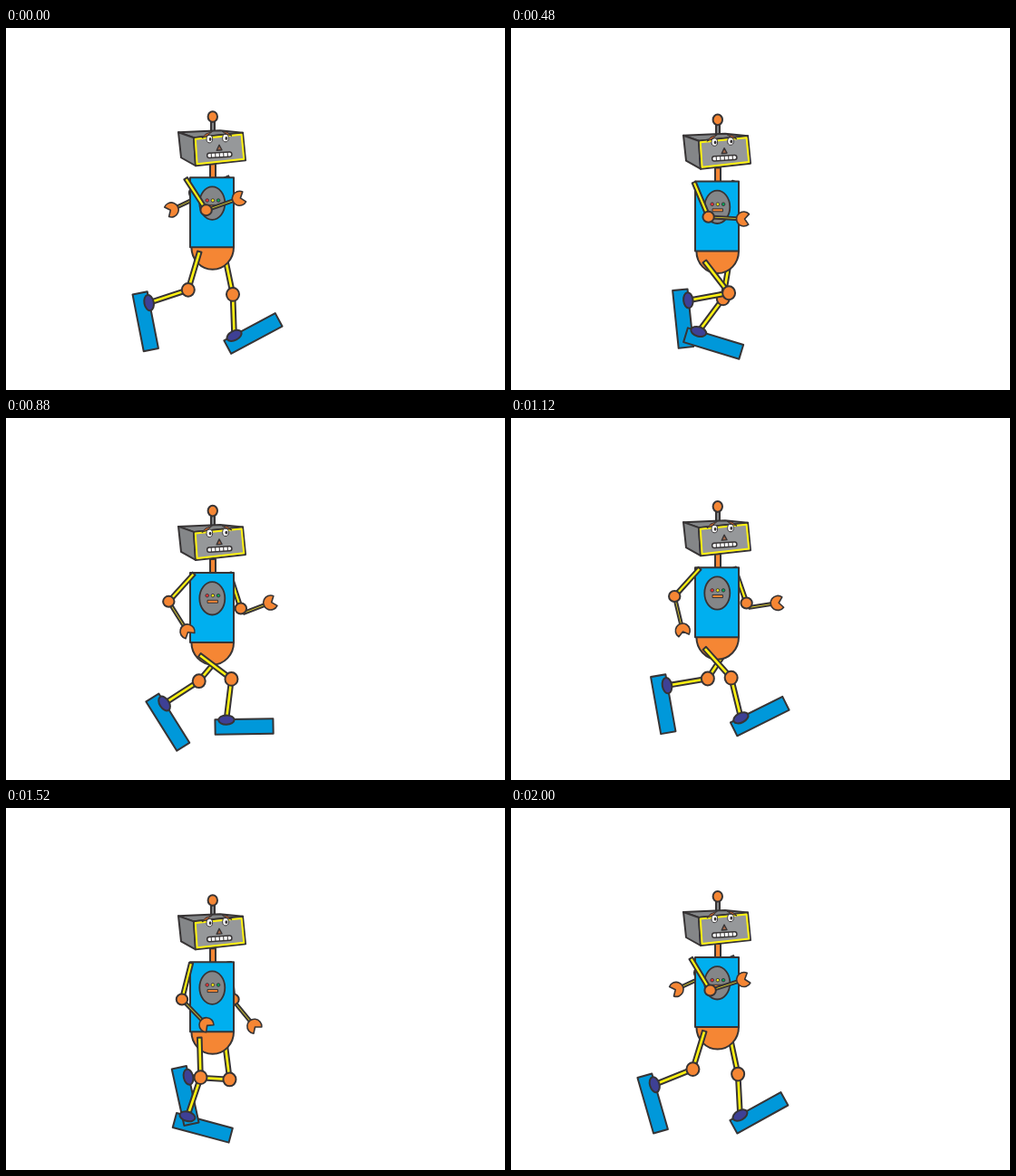
Write an HTML page with a canvas that moves like this. It is 550 by 400 pixels and loops after 2.04 s.

```html
<!DOCTYPE html>
<html lang="en">
<head>
<meta charset="utf-8">
<title>Walking robot</title>
<style>
html, body { margin: 0; width: 100%; height: 100%; overflow: hidden; background: #fff; }
canvas { display: block; }
</style>
</head>
<body>
<canvas id="stage" width="550" height="400"></canvas>
<script>
const c = document.getElementById('stage').getContext('2d');
const LOOP = 2040, STEP = 40;
const INK = '#373435', ORANGE = '#f58634', YELLOW = '#fff212', GREY = '#848688';
const THIGH = 44, SHIN = 45.5, UPPER = 41.5;

// Key poses of the walk. Limb angles are in degrees from straight down, forward positive.
const beats = [280, 680, 880, 1100, 1320, 1720, 2000];
const bob = [172, 167, 171, 165, 174, 166, 165];
const nearLeg = {
  thigh: [4, 62, 53, 43, 27, -16, -17],
  shin: [-90, -57, -7, 14, -7, -31, -68],
  foot: [105, 45, -1, -27, 0, 31, 74]
};
const farLeg = {
  thigh: [11, -34, -40, -34, -23, 30, 12],
  shin: [-27, -45, -57, -78, -104, -70, 3],
  foot: [0, 35, 58, 78, 98, 39, -29]
};
const nearArm = {
  upper: [42, -11, -42, -42, -36, 12, 31],
  fore: [116, 47, 32, 15, -1, 96, 108]
};
const farArm = {
  upper: [-58, 14, 18, 19, 20, -20, -66],
  fore: [-53, 86, 111, 100, 88, -20, -65]
};

// Smooth cyclic interpolation over the beats that never overshoots a key.
function ease(keys, t) {
  const n = beats.length;
  const time = i => beats[(i + n) % n] + Math.floor(i / n) * LOOP;
  const value = i => keys[(i + n) % n];
  const slope = i => (value(i + 1) - value(i)) / (time(i + 1) - time(i));
  const tangent = i => {
    const a = slope(i - 1), b = slope(i);
    return a * b > 0 ? 2 * a * b / (a + b) : 0;
  };
  let i = n - 1;
  while (time(i) > t) i--;
  const h = time(i + 1) - time(i), u = (t - time(i)) / h, v = 1 - u;
  return v * v * (1 + 2 * u) * value(i) + u * u * (3 - 2 * u) * value(i + 1)
    + h * u * v * (v * tangent(i) - u * tangent(i + 1));
}

const rad = deg => deg * Math.PI / 180;
const wave = (t, peak) => Math.cos(2 * Math.PI * (t - peak) / LOOP);
const reach = ([x, y], length, angle) =>
  [x + length * Math.sin(rad(angle)), y + length * Math.cos(rad(angle))];

function paint(fill, width = 2) {
  c.fillStyle = fill;
  c.fill();
  if (width) {
    c.lineWidth = width;
    c.strokeStyle = INK;
    c.stroke();
  }
}
function trace(...p) {
  c.beginPath();
  for (let i = 0; i < p.length; i += 2) c.lineTo(p[i], p[i + 1]);
  c.closePath();
}
function poly(fill, width, ...p) {
  trace(...p);
  paint(fill, width);
}
function oval(x, y, rx, ry, fill, width) {
  c.beginPath();
  c.ellipse(x, y, rx, ry, 0, 0, 7);
  paint(fill, width);
}
function box(x, y, w, h, fill, width) {
  c.beginPath();
  c.rect(x, y, w, h);
  paint(fill, width);
}
function at([x, y], degrees, draw) {
  c.save();
  c.translate(x, y);
  c.rotate(rad(degrees));
  draw();
  c.restore();
}
function bar(from, length, angle, w, fill = YELLOW) {
  at(from, -angle, () => box(-w / 2, 0, w, length, fill));
}

function poseLeg(leg, hip, t) {
  const [thigh, shin, foot] = [leg.thigh, leg.shin, leg.foot].map(k => ease(k, t));
  const knee = reach(hip, THIGH, thigh);
  return { hip, knee, ankle: reach(knee, SHIN, shin), thigh, shin, foot };
}
function drawFoot({ ankle, foot }) {
  at(ankle, foot, () => box(-12.5, -0.5, 64, 16.5, '#0098da'));
}
function drawLeg({ hip, knee, ankle, thigh, shin, foot }) {
  bar(knee, SHIN, shin, 4.6);
  bar(hip, THIGH, thigh, 4.6);
  oval(...knee, 7, 7.4, ORANGE);
  at(ankle, foot, () => oval(0, 0, 8.7, 5.2, '#3e4095'));
}
function drawArm(arm, shoulder, t, length, [dx, dy] = [0, 0]) {
  const upper = ease(arm.upper, t), fore = ease(arm.fore, t);
  const elbow = reach(shoulder, UPPER, upper);
  const joint = [elbow[0] + dx, elbow[1] + dy];
  bar(shoulder, UPPER, upper, 4.2);
  bar(joint, length, fore, 2.8, '#e0d22a');
  oval(...elbow, 6.2, 6, ORANGE);
  at(reach(joint, length, fore), 90 - fore, () => {
    c.beginPath();
    c.moveTo(1, 0);
    c.arc(0, 0, 8, rad(46), rad(314));
    c.closePath();
    paint(ORANGE, 1.6);
  });
}

function drawHead() {
  box(226, -62, 4, 14, GREY);
  oval(227.8, -67.3, 5.2, 5.8, ORANGE);
  poly(GREY, 2, 190, -50, 236, -52, 261, -49.5, 207, -44);
  poly(GREY, 2, 190, -50, 207, -44, 209, -13, 193, -22);
  poly('#96989a', 2, 207, -44, 261, -49.5, 264, -19, 209, -13);
  trace(208.8, -42.4, 259.6, -47.4, 262.2, -20.6, 210.6, -15);
  c.lineWidth = 2;
  c.strokeStyle = YELLOW;
  c.stroke();

  for (const [x, y] of [[224.3, -42.6], [242, -43.6]]) {
    oval(x, y, 3.3, 4.2, '#fefefe', 1);
    oval(x + 0.8, y + 0.3, 1.4, 1.9, INK, 0);
  }
  poly('#c1602c', 1, 216, -43.5, 220, -48, 227.5, -51, 221.5, -46);
  poly('#c1602c', 1, 238, -51, 244, -50, 249, -46, 243, -48);
  poly('#a5694a', 1.4, 232.2, -30, 235, -36, 238, -30.5);

  at([235.3, -25], -3.5, () => {
    c.beginPath();
    c.roundRect(-13.6, -2.6, 27.2, 5.2, 2.4);
    paint('#fefefe', 1.5);
    c.beginPath();
    for (let x = -9; x < 12; x += 4.5) {
      c.moveTo(x, -2.5);
      c.lineTo(x, 2.5);
    }
    c.lineWidth = 1;
    c.stroke();
  });
}

function drawTorso() {
  c.beginPath();
  c.ellipse(227.7, 77, 23.3, 24.5, 0, 0, Math.PI);
  paint(ORANGE);
  box(225, -15, 6, 16, ORANGE);
  box(203, 0, 48, 77, '#00afef');
  oval(227.3, 28.3, 14, 18.2, GREY, 1.8);
  ['#ed3237', YELLOW, '#00a859'].forEach((fill, i) =>
    oval(221.7 + i * 6.2, 25.2, 1.8, 1.8, fill, 0.9));
  box(222, 30.3, 11.5, 3, ORANGE, 1);
}

function draw(t) {
  const top = ease(bob, t);
  const near = poseLeg(nearLeg, [213.3, 86 - 5 * wave(t, 1850)], t);
  const far = poseLeg(farLeg, [241, 86], t);
  c.clearRect(0, 0, 550, 400);
  c.save();
  c.translate(0, top);
  drawArm(farArm, [246, 0], t, 32, [3, 5]);
  drawFoot(near);
  drawFoot(far);
  drawLeg(far);
  drawTorso();
  // The head bobs a little less than the body.
  at([0, (165 - top) * 0.18], 0, drawHead);
  drawLeg(near);
  drawArm(nearArm, [203 + 5 * wave(t, 1080), 1], t, 39);
  c.restore();
}

c.lineJoin = 'round';
const start = performance.now();
function tick() {
  const t = (performance.now() - start) % LOOP;
  draw(Math.floor(t / STEP) * STEP);
  requestAnimationFrame(tick);
}
tick();
</script>
</body>
</html>
```
